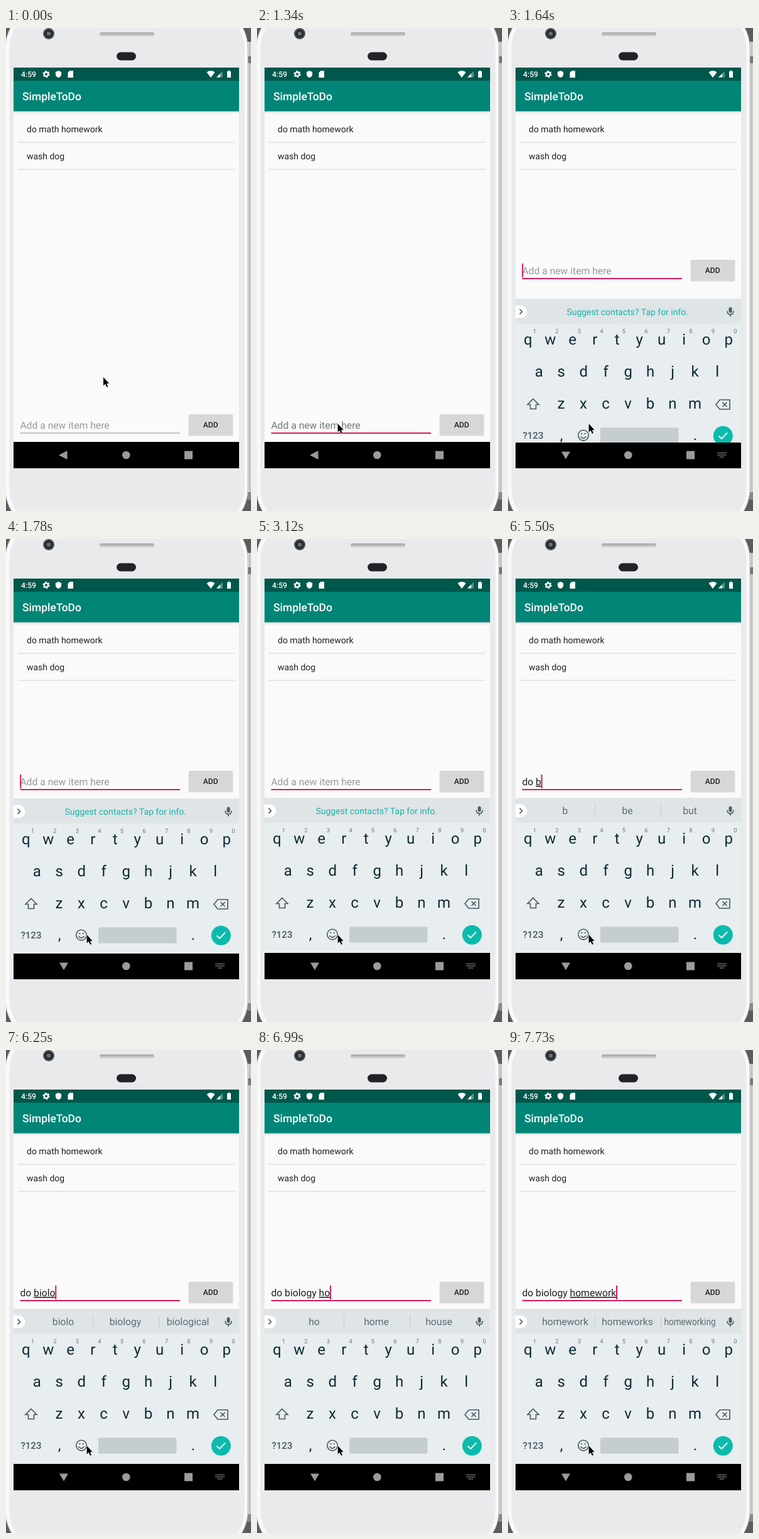
An HTML page that plays this animation: 390 px wide and 769 px high, repeating every 8 s.

```html
<!DOCTYPE html>
<html lang="en">
<head>
<meta charset="utf-8">
<title>To-do list</title>
<style>
  html, body { margin: 0; width: 100%; height: 100%; overflow: hidden; background: #5c5c5c; }
  svg { display: block; width: 100%; height: 100%; font-family: Roboto, sans-serif; text-rendering: geometricPrecision; }
  text { white-space: pre; }
  .mid { text-anchor: middle; }
  .medium { font-weight: 500; }
  .item { font-size: 13.97px; fill: #212121; }
  .field { font-size: 15.7px; }
  .composing { text-decoration: underline; text-decoration-skip-ink: none; }
  .key { font-size: 24px; fill: #0c2a35; }
  .digit { font-size: 9.5px; fill: #6a787f; }
  .word { font-size: 15.7px; fill: #5b6b73; }
  .line { fill: none; stroke: #46575f; stroke-width: 1.6; }
</style>
</head>
<body>
<svg viewBox="0 0 390 769">
  <defs>
    <linearGradient id="shade" x2="0" y2="1">
      <stop stop-color="#000" stop-opacity=".13"/>
      <stop offset="1" stop-color="#000" stop-opacity="0"/>
    </linearGradient>
    <linearGradient id="speaker" x2="0" y2="1">
      <stop stop-color="#a2a4a6"/>
      <stop offset="1" stop-color="#d2d4d6"/>
    </linearGradient>
    <clipPath id="screen"><rect x="12" y="63" width="359" height="597"/></clipPath>
  </defs>

  <!-- Phone body -->
  <rect x="380" y="22" width="10" height="726" fill="#d8d8d8"/>
  <path d="M388 22V748" stroke="#aaa" stroke-width="1.2"/>
  <rect x="384" y="45" width="6" height="11" fill="#777"/>
  <rect x="384" y="739" width="6" height="12" fill="#888"/>
  <rect x="-1" y="-36" width="386" height="838" rx="68" fill="#f9f9f9" stroke="#b5b5b5"/>
  <rect x="5.5" y="-29" width="374" height="824" rx="61" fill="#e8eaec"/>
  <circle cx="68" cy="9" r="9" fill="#4a4d50"/>
  <circle cx="68" cy="9" r="6.5" fill="#25282b"/>
  <circle cx="68" cy="9" r="3.2" fill="#6a6e73"/>
  <rect x="149" y="7" width="87" height="6" rx="2.5" fill="url(#speaker)"/>
  <rect x="176" y="38.5" width="31" height="13" rx="6.5" fill="#222326"/>

  <!-- App -->
  <rect x="12" y="63" width="359" height="638" fill="#fafafa"/>
  <rect x="12" y="132" width="359" height="5" fill="url(#shade)"/>
  <rect x="12" y="84" width="359" height="48.6" fill="#008577"/>
  <rect x="12" y="63" width="359" height="21" fill="#00574b"/>
  <g fill="#fff">
    <text class="medium" x="24" y="78" font-size="12.2">4:59</text>
    <circle cx="64" cy="73.5" r="3.2" fill="none" stroke="#fff" stroke-width="2.4"/>
    <circle cx="64" cy="73.5" r="4.8" fill="none" stroke="#fff" stroke-width="1.7" stroke-dasharray="2.4 2.63"/>
    <path d="M83.5 68l4.6 2v3.4q0 4-4.6 5.6q-4.6-1.6-4.6-5.6V70z"/>
    <path d="M101.5 68h5.5v11h-8.5V71z"/>
    <path d="M319.5 70.5q6.5-4.8 13 0L326 79z"/>
    <path d="M345 68.5v10h-10z" opacity=".35"/>
    <path d="M341 72.5v6h-6z"/>
    <path d="M352 69h1.7v-1.2h2.6V69H358v10h-6z"/>
    <text class="medium" x="26" y="115" font-size="17.46">SimpleToDo</text>
  </g>
  <text class="item" x="33" y="166">do math homework</text>
  <text class="item" x="33" y="209">wash dog</text>
  <path d="M19 182H364M19 225H364" stroke="#dfdfdf" stroke-width="1.6"/>

  <!-- Input row -->
  <g id="row">
    <text class="field" id="hint" x="22.4" y="638">Add a new item here</text>
    <text class="field" id="entry" x="22.4" y="638" fill="#212121"><tspan id="done"></tspan><tspan id="composing" class="composing"></tspan></text>
    <path id="underline" d="M22.5 645H277"/>
    <rect id="caret" y="621" width="2" height="22" fill="#d81b60"/>
    <rect x="290.5" y="616" width="71" height="33.5" rx="2" fill="#000" opacity=".12"/>
    <rect x="291" y="615" width="70" height="33" rx="1.8" fill="#d6d7d7"/>
    <text class="mid medium" x="325.7" y="636" font-size="12.2" fill="#212121">ADD</text>
  </g>

  <!-- Navigation bar -->
  <rect x="12" y="659" width="359" height="42" fill="#000"/>
  <g fill="#9b9b9b">
    <path id="back" d="M84 680l13.5-7v14z"/>
    <circle cx="191.3" cy="680" r="6.3"/>
    <rect x="284" y="673.5" width="13" height="13"/>
    <g id="switcher">
      <path d="M85 674.5h14L92 686.5z"/>
      <path d="M333.5 676.5h14M333.5 679.7h14M337 683h7" stroke="#9b9b9b" stroke-width="1.6" stroke-dasharray="1.7 .8"/>
    </g>
  </g>

  <!-- Keyboard -->
  <g clip-path="url(#screen)">
    <g id="keyboard">
      <rect x="12" y="412" width="359" height="247" fill="#e8edf0"/>
      <rect x="12" y="412.5" width="359" height="39" fill="#dfe4e7"/>
      <path d="M12 422.5h8a10.3 10.3 0 0 1 0 20.6h-8z" fill="#fff"/>
      <path class="line" d="M18.5 428.5l4 4.2l-4 4.2"/>
      <text class="mid" id="notice" x="190.2" y="437.7" font-size="13.97" fill="#15b5a7">Suggest contacts? Tap for info.</text>
      <g id="strip">
        <path d="M138.5 422V443M243.5 422V443" stroke="#c3cace"/>
      </g>
      <rect x="351.5" y="425.5" width="5" height="9" rx="2.5" fill="#4c5d65"/>
      <path class="line" d="M349 431.5q0 5.5 5 5.500t5-5.5M354 437v3.5"/>
      <g id="keys"></g>
      <path class="line" d="M40 571.5l9 9h-4.500v7h-9v-7H31z"/>
      <path class="line" d="M337 573h16v15H337l-6-7.5zM341.5 577l7 7M348.5 577l-7 7"/>
      <text class="mid medium" x="40" y="635" font-size="15" fill="#46575f">?123</text>
      <text class="key mid" x="85" y="637">,</text>
      <text class="key mid" x="298" y="637">.</text>
      <circle class="line" cx="120" cy="629.6" r="8.3"/>
      <path class="line" d="M115.5 631.6q4.5 5.5 9 0M116 627h2.5M121.5 627h2.5"/>
      <rect x="147" y="617.2" width="124.5" height="25.5" rx="2.5" fill="#c6cdd1"/>
      <circle cx="342.3" cy="630.2" r="15.5" fill="#0abbac"/>
      <path d="M335.5 630.5l4.5 4.5l9-9.5" fill="none" stroke="#fff" stroke-width="1.9"/>
    </g>
  </g>

  <path id="pointer" d="M0 0V13.5L3.1 10.700L5.300 15.800L7.400 15L5.200 10H9.100Z" stroke="#fff" paint-order="stroke"/>
</svg>
<script>
const LOOP = 8000, SLOT = 82;
const $ = id => document.getElementById(id);
const show = (id, on) => $(id).setAttribute('visibility', on ? 'visible' : 'hidden');

function addText(parent, cls, x, y, label = '') {
  const node = document.createElementNS('http://www.w3.org/2000/svg', 'text');
  node.setAttribute('class', cls + ' mid');
  node.setAttribute('x', x);
  node.setAttribute('y', y);
  node.textContent = label;
  return parent.appendChild(node);
}

[['qwertyuiop', 31.7], ['asdfghjkl', 49.2], ['zxcvbnm', 84.5]].forEach(([letters, x], row) =>
  [...letters].forEach((letter, i) => {
    addText($('keys'), 'key', x + i * 35.5, 485 + row * 51, letter);
    if (row === 0) addText($('keys'), 'digit', 42.5 + i * 35.5, 467, (i + 1) % 10);
  }));

const slots = [91, 190, 289.5].map(x => ({ x, node: addText($('strip'), 'word', 0, 438) }));

// Each track holds [start time, value...]; a value lasts until the next start.
const pointerTrack = [[0, 155, 556], [150, 157, 575], [290, 150, 612], [440, 147.5, 627.5],
  [1190, 134, 629], [1340, 128.6, 630]];
const keyboardTrack = [[0, null], [1640, 19], [1780, 1], [1930, 0]];
const caretTrack = [[0, 0], [1640, 1], [2080, 0], [2520, 1], [3120, 0], [3560, 1], [4610, 0], [5210, 1]];
// start, finished text, word being typed, suggestions
const typingTrack = [
  [0, '', '', ''],
  [3860, '', 'd', ''],
  [4010, '', 'do', ''],
  [4160, 'do ', '', ''],
  [5500, 'do ', 'b', 'b be but'],
  [5650, 'do ', 'bi', 'bi big bit'],
  [5800, 'do ', 'bio', 'bio biology biological'],
  [5950, 'do ', 'biol', 'biol biology biological'],
  [6250, 'do ', 'biolo', 'biolo biology biological'],
  [6390, 'do ', 'biology', 'biology biological biologist'],
  [6540, 'do biology ', '', 'and class test'],
  [6840, 'do biology ', 'h', 'h have her'],
  [6990, 'do biology ', 'ho', 'ho home house'],
  [7130, 'do biology ', 'home', 'home homes house'],
  [7430, 'do biology ', 'homew', 'homew homework homeworks'],
  [7580, 'do biology ', 'homewor', 'homewor homework homeworks'],
  [7730, 'do biology ', 'homework', 'homework homeworks homeworking']
];
const at = (track, t) => track.findLast(entry => entry[0] <= t);

let shownTyping;
function drawTyping(entry) {
  if (entry === shownTyping) return;
  shownTyping = entry;
  const [, done, composing, words] = entry;
  $('done').textContent = done;
  $('composing').textContent = composing;
  $('caret').setAttribute('x', 22.2 + (done + composing ? $('entry').getComputedTextLength() : 0));
  const list = words.split(' ');
  slots.forEach(({ node, x }, i) => {
    node.textContent = list[i] || '';
    // Long suggestions are condensed to their slot.
    const squeeze = Math.min(1, SLOT / (node.getComputedTextLength() || 1));
    node.setAttribute('transform', `translate(${x}) scale(${squeeze} 1)`);
  });
}

function draw(t) {
  const [, px, py] = at(pointerTrack, t);
  const [, drop] = at(keyboardTrack, t);
  const typing = at(typingTrack, t);
  const open = drop !== null, focused = t >= 1340;

  // Shown first: text can only be measured while it is laid out.
  $('keyboard').style.display = open ? '' : 'none';
  drawTyping(typing);
  $('pointer').setAttribute('transform', `translate(${px} ${py})`);
  $('row').setAttribute('transform', `translate(0 ${open ? -246 : 0})`);
  $('keyboard').setAttribute('transform', `translate(0 ${drop || 0})`);
  $('underline').setAttribute('stroke', focused ? '#d81b60' : '#8c8c8c');
  $('underline').setAttribute('stroke-width', focused ? 1.8 : 1);
  $('hint').setAttribute('fill', focused && !open ? '#757575' : '#9a9a9a');
  show('hint', !(typing[1] + typing[2]));
  show('caret', at(caretTrack, t)[1]);
  show('back', !open);
  show('switcher', open);
  show('notice', !typing[3]);
  show('strip', typing[3]);
}

const start = performance.now();
function tick() {
  draw((performance.now() - start) % LOOP);
  requestAnimationFrame(tick);
}
tick();
</script>
</body>
</html>
```
